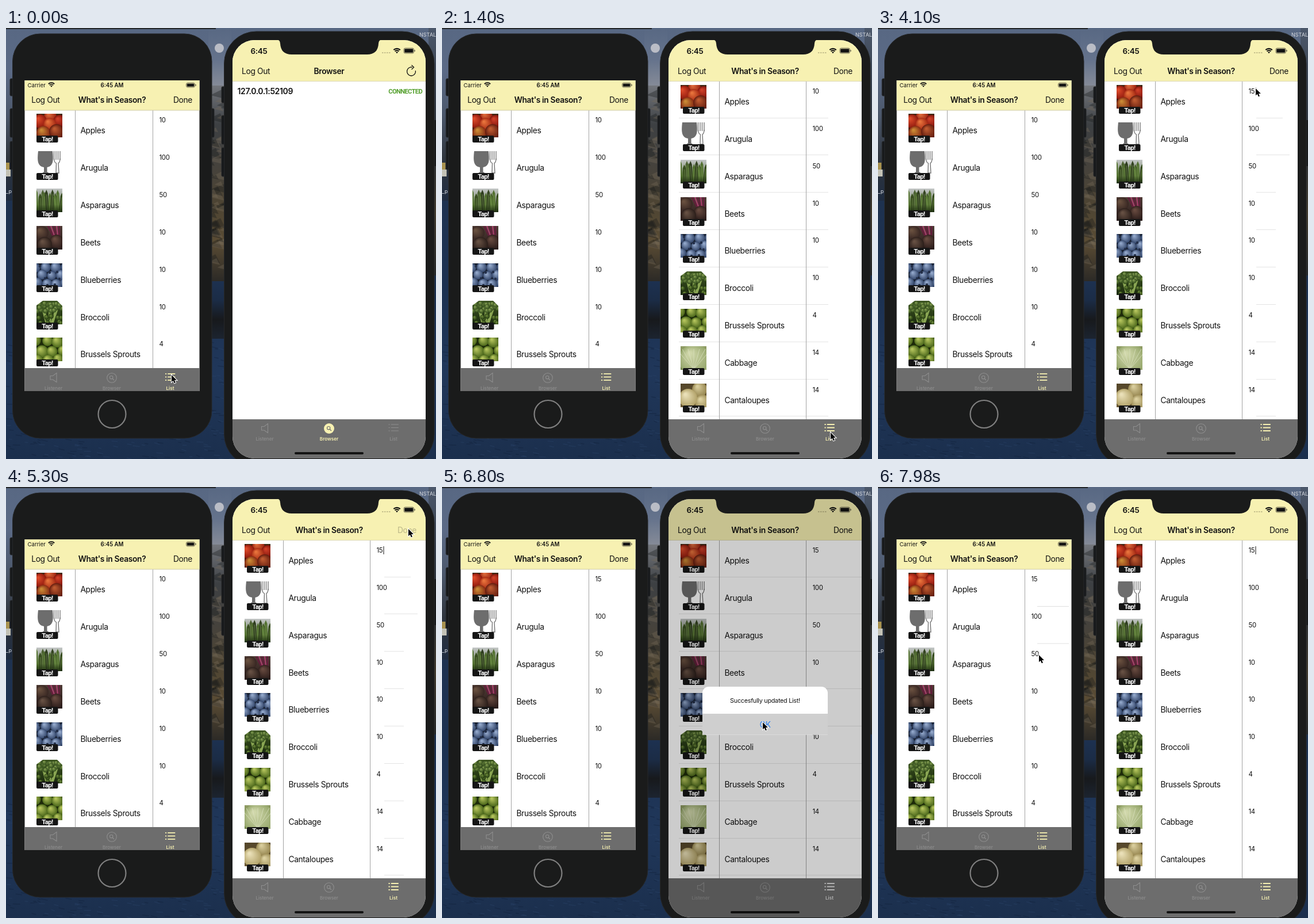
An HTML page with a canvas that plays this animation: 748x749 px, repeating every 8 s.

```html
<!DOCTYPE html>
<html lang="en">
<head>
<meta charset="utf-8">
<title>Two phones sharing a list</title>
<style>
html, body { margin: 0; width: 100%; height: 100%; overflow: hidden; background: #1d3150; }
canvas { display: block; }
</style>
</head>
<body>
<canvas id="stage" width="748" height="749"></canvas>
<script>
const LOOP = 8000;
const YELLOW = '#f7f1b2', BLACK = '#111', CASE = '#1a1b1b', RIM = '#26282a', BAR = '#6d6d6d', FAINT = '#8e8e8e';
const ROWS = [['Apples', 10], ['Arugula', 100], ['Asparagus', 50], ['Beets', 10], ['Blueberries', 10],
  ['Broccoli', 10], ['Brussels Sprouts', 4], ['Cabbage', 14], ['Cantaloupes', 14]];
const PITCH = 64.86;
const stage = document.getElementById('stage').getContext('2d');
let c = stage;

// ---- drawing helpers ----
function rect(x, y, w, h, fill) { c.fillStyle = fill; c.fillRect(x, y, w, h); }

function round(x, y, w, h, r, fill, stroke) {
  c.beginPath();
  c.roundRect(x, y, w, h, r);
  if (fill) { c.fillStyle = fill; c.fill(); }
  if (stroke) { c.strokeStyle = stroke; c.lineWidth = 1; c.stroke(); }
}

function text(s, x, y, size, { weight = 400, color = BLACK, align = 'left', family = 'Inter', tracking = size > 10 ? -.025 : 0 } = {}) {
  c.font = `${weight} ${size}px "${family}", sans-serif`;
  c.letterSpacing = size * tracking + 'px';
  c.textAlign = align;
  c.fillStyle = color;
  c.fillText(s, x, y);
}

const tight = options => ({ weight: 700, family: 'Roboto', tracking: -.06, ...options });

function trace(points, close) {
  c.beginPath();
  points.forEach(([x, y]) => c.lineTo(x, y));
  if (close) c.closePath();
}

function shape(points, fill) {
  trace(points, true);
  c.fillStyle = fill;
  c.fill();
}

function line(points, color, width = 1) {
  trace(points);
  c.strokeStyle = color;
  c.lineWidth = width;
  c.stroke();
}

function circle(x, y, r, fill, stroke, width = 1) {
  c.beginPath();
  c.arc(x, y, r, 0, 7);
  if (fill) { c.fillStyle = fill; c.fill(); }
  if (stroke) { c.strokeStyle = stroke; c.lineWidth = width; c.stroke(); }
}

function gradient(x, y, w, h, ...colors) {
  const g = c.createLinearGradient(0, y, 0, y + h);
  colors.forEach((color, i) => g.addColorStop(i / (colors.length - 1), color));
  rect(x, y, w, h, g);
}

function random(seed) {
  return () => (seed = seed * 16807 % 2147483647) / 2147483647;
}

function cached(w, h, paint) {
  const canvas = document.createElement('canvas');
  canvas.width = w;
  canvas.height = h;
  c = canvas.getContext('2d');
  paint();
  c = stage;
  return canvas;
}

// ---- thumbnails ----
function ball(x, y, r, light, dark) {
  const g = c.createRadialGradient(x - r * .3, y - r * .4, r * .1, x, y, r);
  g.addColorStop(0, light);
  g.addColorStop(1, dark);
  circle(x, y, r, g);
}

function pile(seed, step, r, light, dark) {
  const rnd = random(seed);
  for (let y = step * .35, odd = 0; y < 48; y += step * .85, odd ^= 1)
    for (let x = odd * step / 2; x < 54; x += step)
      ball(x + rnd() * 4 - 2, y + rnd() * 4 - 2, r * (.9 + rnd() * .2), light, dark);
}

const PICTURES = [
  function apples() {
    gradient(0, 0, 45, 41, '#3c2a14', '#4a160b');
    ball(24, 5, 11, '#dd6a3c', '#97200f');
    ball(40, 13, 11, '#cf3f28', '#7d130b');
    ball(6, 13, 12, '#dd4a2a', '#8d180c');
    ball(23, 18, 11, '#e8743c', '#a52813');
    ball(12, 33, 12, '#c98a35', '#862812');
    ball(35, 31, 13, '#bd5a30', '#611a0d');
  },
  function cutlery() {
    c.fillStyle = BAR;
    c.beginPath();
    c.moveTo(3, 0); c.lineTo(28, 0);
    c.bezierCurveTo(30, 17, 29, 26, 18.5, 28);
    c.lineTo(18.5, 36); c.lineTo(26, 41); c.lineTo(6, 41); c.lineTo(13, 36); c.lineTo(13, 28);
    c.bezierCurveTo(2, 26, 1, 17, 3, 0);
    c.fill();
    for (const x of [30.5, 34, 37.5, 41]) line([[x, 0], [x, 15]], BAR, 1.3);
    c.beginPath();
    c.moveTo(30.5, 13); c.quadraticCurveTo(31, 20, 34.5, 21); c.lineTo(34, 38);
    c.lineTo(39, 38); c.lineTo(38, 21); c.quadraticCurveTo(41, 19, 41, 13);
    c.stroke();
  },
  function asparagus() {
    gradient(0, 0, 45, 41, '#c3c6c6', '#53683c');
    const rnd = random(41);
    for (let x = 0; x < 47; x += 3.8) {
      const top = 1 + rnd() * 9, lean = rnd() * 5 - 2.5;
      shape([[x - 2.8, 41], [x - 2.4 + lean, top + 6], [x + lean, top], [x + 2.4 + lean, top + 6], [x + 2.6, 41]],
        `hsl(88 ${30 + rnd() * 15}% ${15 + rnd() * 19}%)`);
      line([[x + lean, top + 8], [x, 41]], '#7f9a5a', .7);
    }
    gradient(0, 28, 45, 13, '#1e2f1000', '#1e2f10');
  },
  function beets() {
    gradient(0, 0, 45, 41, '#4f3d36', '#291b19');
    for (let i = 0; i < 5; i++) line([[20 + i * 5, 0], [30 + i * 2.5, 20]], i % 2 ? '#a33c68' : '#651c3c', 2.5);
    ball(9, 12, 12, '#69503f', '#372622');
    ball(35, 27, 12, '#674a3f', '#30201d');
    ball(14, 32, 13, '#665043', '#2b1e1a');
  },
  function blueberries() {
    rect(0, 0, 45, 41, '#18202f');
    pile(7, 17, 8.8, '#93a8cb', '#34476b');
    for (let i = 0; i < 7; i++) circle(6 + i * 17 % 38, 5 + i * 11 % 34, 2.2, '#232f49');
  },
  function broccoli() {
    gradient(0, 0, 45, 41, '#3d5522', '#1b2a0e');
    for (const x of [12, 24, 35]) line([[x, 15], [22 + (x - 22) / 3, 41]], '#8aa653', 5);
    const rnd = random(99);
    for (let i = 0; i < 34; i++) ball(rnd() * 45, 3 + rnd() * 15, 4, '#829d50', '#354f1d');
    for (let i = 0; i < 12; i++) ball(rnd() * 45, 25 + rnd() * 14, 4, '#6b8839', '#243a10');
    shape([[0, 0], [11, 0], [0, 8]], '#fff');
    shape([[36, 0], [45, 0], [45, 9]], '#fff');
  },
  function sprouts() {
    rect(0, 0, 45, 41, '#1d2a09');
    pile(23, 19, 10, '#b4c45c', '#4a661a');
  },
  function cabbage() {
    gradient(0, 0, 45, 41, '#8f9c64', '#6d7f45');
    ball(24, 23, 27, '#d0d7aa', '#95a66b');
    for (let i = -3; i < 4; i++) line([[23, 40], [23 + i * 5, 23], [23 + i * 10, 5]], '#dfe4c4', .7);
  },
  function melons() {
    gradient(0, 0, 45, 41, '#54462a', '#6a5833');
    ball(33, 10, 13, '#d9cd9c', '#95854f');
    ball(38, 32, 13, '#ddd1a0', '#9c8c55');
    ball(13, 25, 16, '#eae0b8', '#b3a36a');
  }
];
const thumbs = PICTURES.map(paint => cached(45, 41, paint));

// ---- desktop: dusk sky, rocky coast and sea in soft tones ----
function facets(x, y, w, h, count, size, light, dark) {
  const rnd = random(x + y + 17);
  c.globalAlpha = .35;
  for (let i = 0; i < count; i++) {
    const px = x + rnd() * w, py = y + rnd() * h, s = size * (.4 + rnd());
    shape([[px - s, py], [px + s * .4, py - s * .7], [px + s, py + s * .5]], i % 2 ? light : dark);
  }
  c.globalAlpha = 1;
}

const desktop = cached(748, 749, () => {
  gradient(0, 0, 748, 300, '#586883', '#5b6a86', '#4c586c', '#30363f', '#1f2c40');
  gradient(0, 300, 748, 449, '#1e3250', '#1c3151', '#20375a', '#1b2f4d');
  gradient(352, 0, 40, 110, '#586883', '#65738c', '#8c909a');
  circle(371, 35, 8, '#babdc6');
  gradient(352, 100, 40, 340, '#74777d', '#3d4043', '#45423d', '#4d4433', '#5a4c34', '#2c2a26');
  facets(354, 110, 30, 320, 60, 12, '#756b59', '#17191b');
  gradient(352, 440, 40, 100, '#1d3150', '#1b2c46', '#17191c', '#1c2430');
  gradient(735, 0, 13, 430, '#4c586b', '#363f4c', '#2b3036', '#443d30', '#25282a');
  const rnd = random(5);
  for (let i = 0; i < 420; i++) {
    const x = rnd() * 390, y = 545 + rnd() * 204;
    line([[x, y], [x + 5 + rnd() * 8, y + rnd() * 3]], i % 2 ? '#2c476b66' : '#12213a66', 1.4);
  }
  rect(0, 0, 365, 2, '#25282c');
  rect(0, 234, 6, 12, '#a8924f');
  rect(0, 246, 8, 12, '#c3c2b6');
  text('_p', 0, 287, 9, { color: '#e4e7ec' });
  text('NSTAL', 719, 15, 9, { weight: 500, color: '#c3c8d0' });
});

// ---- interface parts ----
function wifi(x, y, s) {
  c.save();
  c.translate(x, y + 5 * s);
  c.scale(s, s);
  c.strokeStyle = c.fillStyle = BLACK;
  c.lineWidth = 2;
  for (const r of [4.9, 8]) { c.beginPath(); c.arc(0, 0, r, -2.32, -.82); c.stroke(); }
  c.beginPath();
  c.moveTo(0, 0);
  c.arc(0, 0, 2.8, -2.32, -.82);
  c.fill();
  c.restore();
}

function battery(x, y, w, h) {
  round(x, y, w, h, 2.5, null, '#66634c');
  round(x + 1.2, y + 1.2, w - 2.4, h - 2.4, 1.2, BLACK);
  rect(x + w + 1, y + h / 2 - 1.5, 1.2, 3, '#66634c');
}

function magnifier(x, y, color) {
  circle(x - .8, y - .8, 2.7, null, color, 1.1);
  line([[x + 1.2, y + 1.2], [x + 4, y + 4]], color, 1.3);
}

function tabs(xs, y, active, tint) {
  const color = i => i === active ? tint : FAINT;
  const [a, b, d] = xs;
  trace([[a - 5.5, y - 3], [a - 1, y - 3], [a + 5.5, y - 8], [a + 5.5, y + 8], [a - 1, y + 3.5], [a - 5.5, y + 3.5]], true);
  c.strokeStyle = color(0);
  c.lineWidth = 1.1;
  c.stroke();
  if (active === 1) circle(b, y + .5, 9, tint);
  else circle(b, y + .5, 8.3, null, FAINT, 1.1);
  magnifier(b, y + .5, active === 1 ? BAR : FAINT);
  for (const dy of [-6.5, -1, 4.5]) {
    const w = active === 2 ? 1.8 : 1.1;
    line([[d - 8.5, y + dy], [d - 6.3, y + dy]], color(2), w);
    line([[d - 4.2, y + dy], [d + 8.8, y + dy]], color(2), w);
  }
  ['Listener', 'Browser', 'List'].forEach((s, i) =>
    text(s, xs[i], y + 21, 8.1, { weight: i === active ? 600 : 500, color: color(i), align: 'center' }));
}

function list(x, y, count, qtyX, tagX, bottom, firstQty) {
  c.save();
  c.beginPath();
  c.rect(x - 22, y - 7, 320, bottom - y + 7);
  c.clip();
  for (let i = 0; i < count; i++) {
    const top = Math.round(y + i * PITCH), [name, qty] = ROWS[i];
    c.drawImage(thumbs[i], x, top);
    round(x + tagX, top + 38, 37.5, 12, 2, '#151515');
    text('Tap!', x + tagX + 18.8, top + 48, 11.5, tight({ color: '#fff', align: 'center' }));
    text(name, x + 76.4, y + i * PITCH + 34, 13.8);
    text(i ? qty : firstQty, x + qtyX - .5, y + i * PITCH + 15, 11.4);
  }
  for (const dx of [67.5, qtyX - 11.5]) line([[x + dx, y - 7], [x + dx, bottom]], '#a3a3a3');
  c.restore();
}

function header(x, y, title, titleX) {
  text('Log Out', x, y, 13.8);
  text(title, titleX, y, 13.8, { weight: 600, align: 'center' });
}

// ---- left phone ----
function leftPhone(t) {
  for (const [y, h] of [[88, 30], [140, 50], [197, 49]]) round(7, y, 8, h, 2, '#17191b', RIM);
  round(355, 140, 7, 50, 2, '#17191b', RIM);
  round(11.5, 10, 346.5, 703, 48, CASE, RIM);
  circle(184.5, 671, 24, null, '#808080', 2.2);
  rect(32.5, 91, 304, 540, '#fff');
  list(53, 149.3, 7, 214, 0, 591, t < 5600 ? '10' : '15');
  if (t >= 7680) for (const y of [207.5, 272]) line([[277, y], [332, y]], '#e0e0e0');
  rect(32.5, 91, 304, 52, YELLOW);
  rect(32.5, 142.5, 304, 1, '#cfcbaa');
  text('Carrier', 37.5, 102.5, 9.6);
  wifi(79, 98, .95);
  text('6:45 AM', 184.5, 102.5, 9.7, { weight: 600, align: 'center' });
  battery(313.5, 95.5, 15, 7.5);
  header(44.2, 130, "What's in Season?", 184.5);
  text('Done', 324, 130, 13.8, { align: 'right' });
  rect(32.5, 591, 304, 40, BAR);
  tabs([82.5, 184, 285.5], 607.5, 2, YELLOW);
}

// ---- right phone ----
function separators(t) {
  if (t < 1400 || t >= 7080 || (t >= 5600 && t < 5750)) return;
  const start = t >= 4100 && t < 5600 ? 658 : 412;
  for (let i = 0; i < 9; i++) {
    const y = Math.floor(156 + i * PITCH) + .5;
    const end = t < 2000 ? 672 : t >= 5600 ? 730 : [704, 716][i] || 692;
    line([[start, y], [end, y]], '#e4e4e4');
  }
}

function seasonScreen(t) {
  const qty = t < 3350 ? '10' : t < 3500 ? '1' : '15';
  separators(t);
  list(415, 99, 9, 230, 4, 680, qty);
  if ((t >= 2750 && t < 5600) || t >= 7830) rect(qty === '1' ? 650 : 656.5, 103, 1, 14, BLACK);
}

function browserScreen() {
  text('127.0.0.1:52109', 402.5, 115, 14, { weight: 600 });
  text('CONNECTED', 724, 114, 11.2, tight({ color: '#55a02f', align: 'right' }));
}

function refresh() {
  c.beginPath();
  c.arc(705, 75.5, 7.5, -.2, 4.95);
  c.strokeStyle = BLACK;
  c.lineWidth = 1.3;
  c.stroke();
  line([[705.5, 64.5], [709.5, 68.3], [705.5, 72]], BLACK, 1.3);
}

function alertBox(t) {
  const early = t < 5750, leaving = t >= 6930, pressed = t >= 6650 && !leaving;
  rect(390, 20, 345, 730, `rgba(0,0,0,${early ? .18 : leaving ? .08 : .2})`);
  c.save();
  c.globalAlpha = early ? .85 : leaving ? .4 : 1;
  c.translate(562, 388.5);
  if (early) c.scale(1.026, 1.026);
  c.translate(-562, -388.5);
  round(453, 347, 218, 83.5, pressed ? [11, 11, 0, 0] : 11, '#fff');
  if (pressed) rect(453, 394, 218, 36.5, '#cfcfcf');
  else rect(453, 394, 218, .8, '#bbb');
  c.globalAlpha = leaving ? .4 : 1;
  text('Succesfully updated List!', 562, 374.5, 10.8, { align: 'center' });
  text('OK', 562, 417.5, 13.8, { color: '#2f80ed', align: 'center' });
  c.restore();
}

function rightPhone(t) {
  const onList = t >= 890, alerting = t >= 5600 && t < 7080;
  for (const [y, h] of [[102, 28], [152, 50], [208, 50]]) round(375, y, 8, h, 2, '#17191b', RIM);
  round(740, 160, 9, 80, 2, '#17191b');
  round(379.5, 6, 365.5, 756, 56, CASE, RIM);

  c.save();
  c.beginPath();
  c.roundRect(394, 21, 336, 727, 38);
  c.clip();
  rect(394, 21, 336, 727, '#fff');
  if (onList) seasonScreen(t); else browserScreen();
  rect(394, 21, 336, 71.5, YELLOW);
  rect(394, 92, 336, 1, '#dcd8b4');
  text('6:45', 425.5, 44.5, 13.5, { weight: 600 });
  for (let x = 654; x < 668; x += 4) rect(x, 42, 2.5, 2, '#c6c08d');
  wifi(680, 39, 1.05);
  battery(692, 35, 17.5, 9);
  header(410, 80, onList ? "What's in Season?" : 'Browser', 562);
  if (onList) {
    c.globalAlpha = t >= 5300 && t < 5600 ? .25 : t >= 5600 && t < 5750 ? .6 : 1;
    text('Done', 714, 80, 13.8, { align: 'right' });
    c.globalAlpha = 1;
  } else refresh();
  rect(394, 680, 336, 70, BAR);
  tabs([450, 562, 674], 695.5, onList ? 2 : 1, alerting ? '#dedede' : YELLOW);
  round(502, 737, 120, 4, 2, '#141414');
  if (alerting) alertBox(t);
  c.restore();

  c.beginPath();
  c.moveTo(471, 20);
  c.quadraticCurveTo(477, 21, 477, 27);
  c.quadraticCurveTo(478, 46, 497, 46);
  c.lineTo(628, 46);
  c.quadraticCurveTo(647, 46, 648, 27);
  c.quadraticCurveTo(648, 21, 654, 20);
  c.fillStyle = CASE;
  c.fill();
}

// ---- pointer: time, x, y ----
const PATH = [[0, 288, 603], [290, 480, 690], [440, 620, 737], [590, 694, 712], [890, 676, 703],
  [1550, 676, 703], [2000, 680, 430], [2200, 704, 221], [2300, 692, 150], [2450, 657, 105],
  [4250, 657, 105], [4700, 722, 62], [5150, 700, 73], [5600, 700, 73], [6500, 558, 409],
  [6930, 558, 409], [7400, 320, 195], [7680, 280, 292], [8000, 280, 292]];

function pointer(t) {
  const i = Math.max(1, PATH.findIndex(key => key[0] > t));
  const [t0, x0, y0] = PATH[i - 1], [t1, x1, y1] = PATH[i];
  const k = Math.max(0, (t - t0) / (t1 - t0)), e = k * k * (3 - 2 * k);
  c.save();
  c.translate(x0 + (x1 - x0) * e, y0 + (y1 - y0) * e);
  trace([[0, 0], [0, 12.3], [2.8, 9.7], [4.8, 14.3], [6.9, 13.4], [5, 8.9], [8.9, 8.9]], true);
  c.strokeStyle = '#fff';
  c.lineWidth = 2;
  c.stroke();
  c.fillStyle = '#000';
  c.fill();
  c.restore();
}

// The picture advances every 150 ms, with two shifts of phase.
function sampled(t) {
  const phase = t < 1100 ? 140 : t < 6940 ? 50 : 30;
  return t - (t - phase + 150) % 150;
}

function frame(now) {
  const t = sampled(now % LOOP);
  c.drawImage(desktop, 0, 0);
  leftPhone(t);
  rightPhone(t);
  pointer(t);
  requestAnimationFrame(frame);
}
requestAnimationFrame(frame);
</script>
</body>
</html>
```
